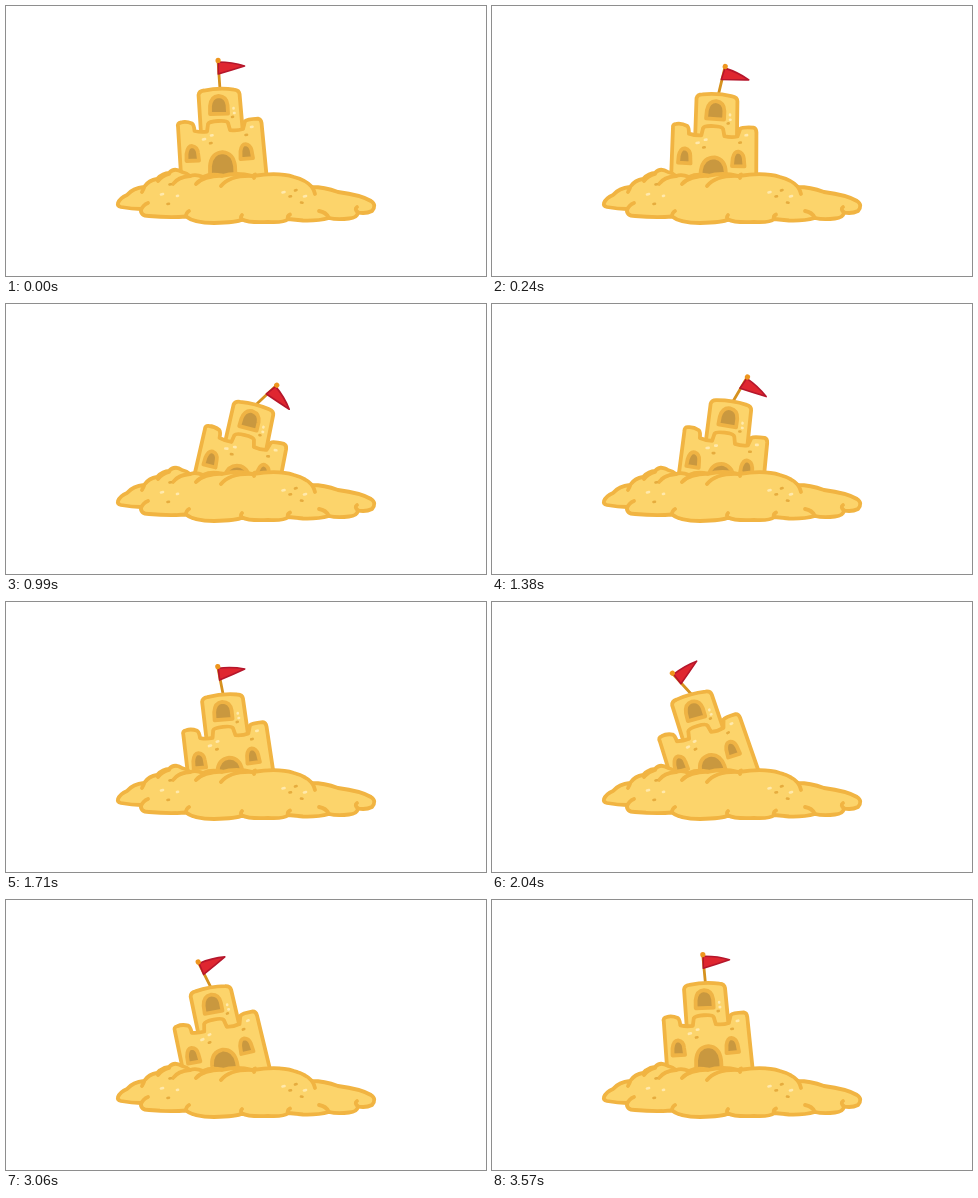
Recreate the animation shown at these times as an HTML page. Size 480x270 px, loop 3.6 s.

```html
<!DOCTYPE html>
<html lang="en">
<head>
<meta charset="utf-8">
<title>Swaying sandcastle</title>
<style>
  html, body { margin: 0; width: 100%; height: 100%; overflow: hidden; background: #fff; }
  svg { display: block; width: 100%; height: 100%; }
  .sand { fill: #fcd46b; stroke: #f1b442; }
  .line { fill: none; stroke: #f1b442; }
  .hole { fill: #c9983f; stroke: #efb344; }
  .light { stroke: #ffe9ac; stroke-width: 2.6; }
  .dark { stroke: #e6ac3e; stroke-width: 2.6; }
</style>
</head>
<body>
<svg viewBox="0 0 480 270" fill="none" stroke-width="3.8" stroke-linecap="round" stroke-linejoin="round">
  <g id="castle">
    <g id="flag">
      <path d="M214 84L212 56" stroke="#d6921f" stroke-width="2.8"/>
      <path d="M212.2 56Q226 56 238.5 60Q226 64 212.2 68Z" fill="#df2630" stroke="#b5162b" stroke-width="1.6"/>
      <circle cx="212" cy="54.4" r="2.6" fill="#ee961f"/>
    </g>
    <path class="sand" d="M195 128L192.5 89Q193 85 198 84.500Q213 81.500 228 83.500Q233 84 233.500 88L237 128Z"/>
    <path class="sand" d="M176 185L172 121Q171 117 175 116.500Q180 115 186 117.500Q188 119 188.500 125Q195 126.500 201 125.500L202 118Q203 115.500 212 115Q221 114.500 222 117L224 124Q231 125 237 123L239 115Q241 113 252 112.500Q255 113 255.500 117L262 185Z"/>
    <path class="hole" d="M204 108V100Q205 90.500 212.500 90Q220.500 90.500 221.500 99L222 107.500Z"/>
    <path class="hole" d="M180.500 155V148Q181.500 140 186 140Q191.500 141 192 147L193 154.500Z"/>
    <path class="hole" d="M234.500 153V145Q235.500 138 239.500 138Q244 138.500 245.500 144L247 152Z"/>
    <path class="hole" d="M204 180V160Q205 147 216.500 146Q227.500 147 229 160L230 180Z"/>
    <path class="light" d="M197 133.500l2-.5M205 129.500l1.500-.3M227.500 102v.5M228 107h.5M245 121l1.500-.3"/>
    <path class="dark" d="M204 137.300l1.500-.3M239.500 129l1.500-.3M226 111l1-.2"/>
  </g>
  <path class="sand" d="M112 197Q114 192 121 189Q127 182 138 181Q143 174 151 173Q157 167 163 167Q168 161 176 166Q181 167 184 170Q190 168 197 171Q206 167 216 170Q230 166 247 170Q272 166 288 171Q300 174 306 181Q318 181 332 186Q355 189 365 195Q371 199 366 205Q360 208 352 206.500Q351 212 343 212.500Q331 214 323 212Q312 215 297 214.500L282 213Q278 217 262 216Q243 217 236 213.500Q231 216.500 208 217Q188 217 180 210.500Q164 212 143 210Q134 210 135 203Q126 203 115 201Q111 200 112 197Z"/>
  <path class="line" d="M135 204Q137 199 142 197M138 182Q137 184 136 186M152 175Q156 170 163 168M167 178Q172 171 184 170M190 178Q197 170 216 169.500M215 180Q224 169 247 170M248 172Q247 169 249 168.500M306 181Q308 184 309 188M180 210Q180 207 183 205M236 214Q234 211 236 209M282 213Q281 210 284 208.500M323 212Q320 206 313 205M352 206.500Q348 203 351 201"/>
  <path class="light" d="M155 188.500l2-.4M171 190l1-.2M276.500 186.500l2-.4M298 190.500l2-.4"/>
  <path class="dark" d="M163.500 178.500l1.500-.3M161.500 198l1.500-.3M289 184.500l1.500-.5M283.500 190.500l1.500-.2M295 196.500l1.500.3"/>
</svg>
<script>
const LOOP = 3600, RIGHT = 1080, LEFT = 2160;
const castle = document.getElementById('castle');
const flag = document.getElementById('flag');

// Rest -> right extreme -> left extreme -> rest, slowing down at both extremes.
function sway(t, right, left) {
  if (t < RIGHT) return right * Math.sin(Math.PI / 2 * t / RIGHT);
  if (t < LEFT) {
    const ease = (1 - Math.cos(Math.PI * (t - RIGHT) / (LEFT - RIGHT))) / 2;
    return right + (left - right) * ease;
  }
  return left * Math.cos(Math.PI / 2 * (t - LEFT) / (LOOP - LEFT));
}

function draw() {
  const t = performance.now() % LOOP;
  const tilt = sway(t, 16.6, -14.6);
  const flagTilt = sway(t, 51, -41) - tilt;
  castle.setAttribute('transform',
    `translate(${sway(t, 11.8, 5.5)} ${sway(t, 15.4, 6)}) rotate(${tilt} 217 168)`);
  flag.setAttribute('transform', `rotate(${flagTilt} 214 83)`);
  requestAnimationFrame(draw);
}
draw();
</script>
</body>
</html>
```
